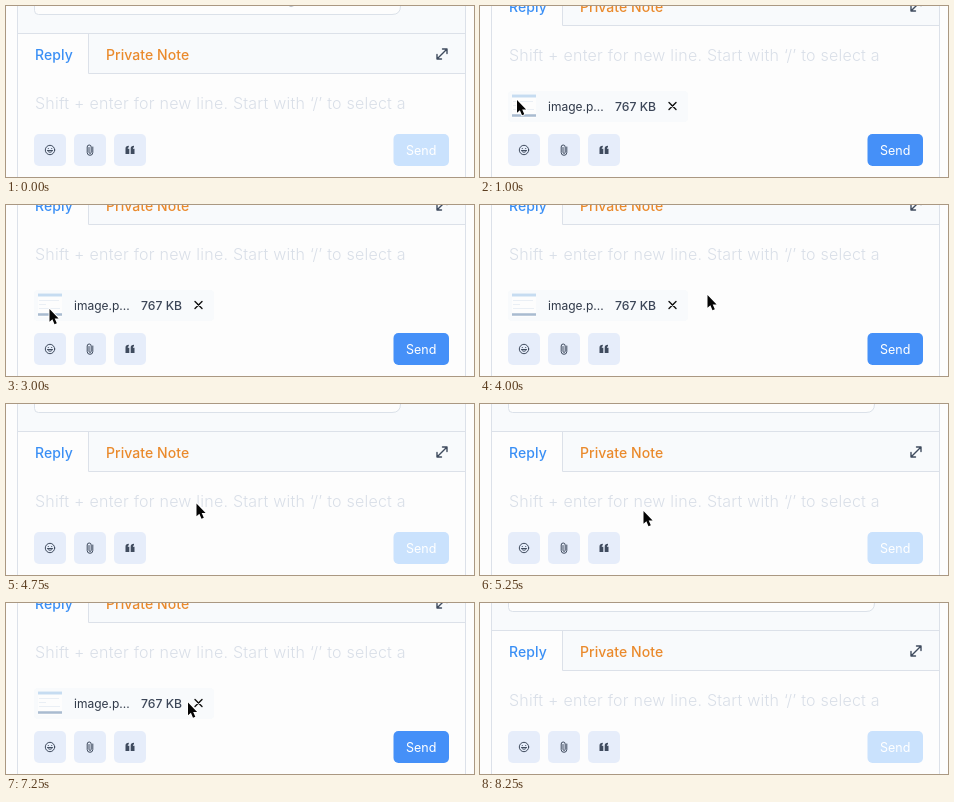
These frames come from a looping animation (468 px wide and 171 px high, 9250 ms). An HTML page:

```html
<!DOCTYPE html>
<html lang="en">
<head>
<meta charset="utf-8">
<title>Reply box</title>
<style>
  html, body { margin: 0; width: 100%; height: 100%; overflow: hidden; background: #fdfdfd; }
  svg { display: block; width: 468px; height: 171px; }
  text { font-family: Inter, sans-serif; font-weight: 500; }
  .tab { font-size: 14px; letter-spacing: .07px; }
  .hint { font-size: 16px; font-weight: 300; letter-spacing: .23px; fill: #d9dfe8; }
  .regular { font-weight: 400; }
  .line { fill: none; stroke: #dce1e9; }
  .icon { fill: none; stroke: #3f4b5e; stroke-linecap: round; stroke-linejoin: round; }
  .key { fill: #e6edfa; }
</style>
</head>
<body>
<svg viewBox="0 0 468 171">
  <rect width="468" height="171" fill="#fdfdfd"/>
  <g id="sheet">
    <rect x="12" y="-2" width="447" height="29" fill="#f8fafc"/>
    <path d="M28.5 -4V4.5Q28.5 8.5 32.5 8.5H386Q394.5 8.5 394.5 0V-4Z" fill="#fdfdfd" stroke="#dbe1e9"/>
    <path id="tail" d="M282.5 -0.5Q285 1.8 288 -0.5" fill="none" stroke="#b9c0ca"/>
    <rect x="82" y="28" width="377" height="39" fill="#f8fafc"/>
    <path class="line" d="M12 27.500H459M82.500 28V67.500H459"/>
    <text class="tab" x="29" y="54" fill="#3a8ff5">Reply</text>
    <text class="tab" x="100" y="54" fill="#ea8a2c">Private Note</text>
    <path class="icon" stroke-width="1.4" d="M431.5 52.5L440.5 43.5M436.5 43H441V47.5M431 48.5V53H435.5"/>
    <text class="hint" x="29" y="103">Shift + enter for new line. Start with ‘/’ to select a</text>
  </g>
  <path class="line" d="M11.5 0V171M459.5 0V171"/>

  <g id="file">
    <rect x="28" y="85" width="180" height="31" rx="4" fill="#f8fafc"/>
    <rect x="32" y="88" width="24" height="24" fill="#fdfdfd"/>
    <path d="M32 90H56" stroke="#c6dcf1" stroke-width="3"/>
    <path d="M33 95.5H53M33 99.5H40M33 103.5H54" stroke="#eaeff5"/>
    <path d="M32 109.5H56" stroke="#a9bbd0" stroke-width="2.5"/>
    <text class="regular" x="68" y="105.4" font-size="12" fill="#303949">image.p...</text>
    <text x="135" y="104.5" font-size="12.2" fill="#3c4658">767 KB</text>
    <path d="M189 96.5L196 103.5M196 96.5L189 103.5" stroke="#111" stroke-width="1.4" stroke-linecap="round"/>
  </g>

  <rect class="key" x="28" y="128" width="32" height="32" rx="5"/>
  <rect class="key" x="68" y="128" width="32" height="32" rx="5"/>
  <rect class="key" x="108" y="128" width="32" height="32" rx="5"/>
  <g class="icon">
    <circle cx="44" cy="144" r="4.7"/>
    <path d="M41.500 144.800Q44 148 46.500 144.800Z"/>
    <path d="M42.300 142.400V142.500M45.700 142.400V142.500"/>
    <path d="M86.800 141V146.500A2.800 2.800 0 0 1 81.200 146.500V141A2 2 0 0 1 85.200 141V146.300A1.100 1.100 0 0 1 83 146.300V141.500"/>
  </g>
  <g fill="#3f4b5e">
    <path id="quote" d="M119.5 142.5Q119.5 140 122.8 139.8V141.3Q121.7 141.6 121.7 142.7H123.300V148H119.5Z"/>
    <use href="#quote" x="5.2"/>
  </g>
  <rect id="send" x="387.5" y="128" width="55.5" height="32" rx="5"/>
  <text class="regular" x="415.2" y="148.8" font-size="12.5" fill="#fff" text-anchor="middle">Send</text>

  <path id="cursor" d="M0 0V12.8L2.9 10.2L5 15.2L7.300 14.2L5.200 9.400H9.100Z"
    fill="#050505" stroke="#fff" stroke-width="1.8" stroke-linejoin="round" paint-order="stroke"/>
</svg>
<script>
  const LOOP = 9250;
  const $ = id => document.getElementById(id);
  const sheet = $('sheet'), tail = $('tail'), file = $('file'), send = $('send'), cursor = $('cursor');

  // [start ms, tip x, tip y]; no position hides the pointer
  const moves = [
    [0], [250, 226, 5], [500, 24, 62.5], [750, 37, 94], [1500, 43.5, 104],
    [4000, 227.5, 90], [4250, 190.5, 99.5], [5000, 170, 107], [5250, 163.5, 107],
    [6250, 179, 101], [6500, 182, 99.5], [8000, 182.5, 92.5], [8250]
  ];
  // [from, to] spans with a file attached
  const attached = [[1000, 2000], [3000, 4750], [6000, 7500]];

  const show = (el, on) => el.setAttribute('visibility', on ? 'visible' : 'hidden');

  function draw(t) {
    const hasFile = attached.some(([from, to]) => t >= from && t < to);
    const [, x, y] = moves.filter(m => m[0] <= t).pop();
    sheet.setAttribute('transform', `translate(0 ${hasFile ? -48 : 0})`);
    send.setAttribute('fill', hasFile ? '#4590f8' : '#cae2fd');
    show(file, hasFile);
    show(tail, t < 250);
    show(cursor, x !== undefined);
    if (x !== undefined) cursor.setAttribute('transform', `translate(${x} ${y})`);
  }

  const start = performance.now();
  function tick() {
    draw((performance.now() - start) % LOOP);
    requestAnimationFrame(tick);
  }
  tick();
</script>
</body>
</html>
```
